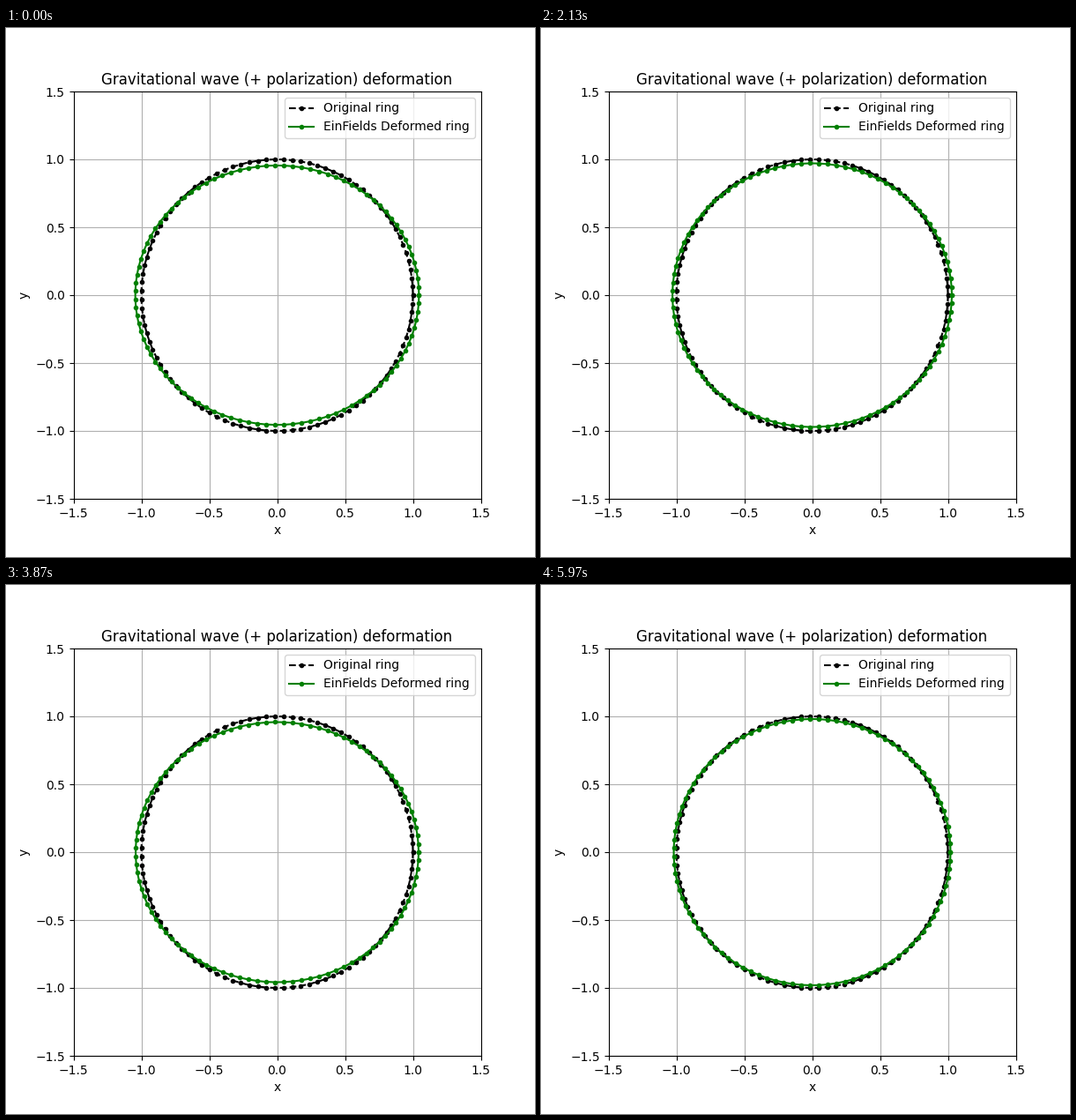
Write a matplotlib script that moves like this. It is 600x600 px and loops after 6000 ms.

```python
import numpy as np
import matplotlib.pyplot as plt
from matplotlib.animation import FuncAnimation

FRAMES = 200
INTERVAL = 30      # ms
STEP = 0.1         # wave phase per frame, radians
AMPLITUDE = 0.0505
OFFSET = -0.0057

theta = np.linspace(0, 2 * np.pi, 100)
x0, y0 = np.cos(theta), np.sin(theta)


def deform(phase):
    """Stretch one axis of the ring while squeezing the other."""
    strain = OFFSET + AMPLITUDE * np.cos(phase)
    return x0 * (1 + strain), y0 * (1 - strain)


fig, ax = plt.subplots(figsize=(6, 6), dpi=100)
ax.set_aspect("equal")
ax.set_xlim(-1.5, 1.5)
ax.set_ylim(-1.5, 1.5)
ax.set_xlabel("x")
ax.set_ylabel("y")
ax.set_title("Gravitational wave (+ polarization) deformation")
ax.grid(True)

ax.plot(x0, y0, "o--", color="black", markersize=3, label="Original ring")
ring, = ax.plot(*deform(0), "o-", color="green", markersize=3,
                label="EinFields Deformed ring")
ax.legend(loc="upper right")


def update(frame):
    ring.set_data(*deform(STEP * frame))
    return ring,


anim = FuncAnimation(fig, update, frames=FRAMES, interval=INTERVAL,
                     repeat=True, repeat_delay=0)
plt.show()
```
